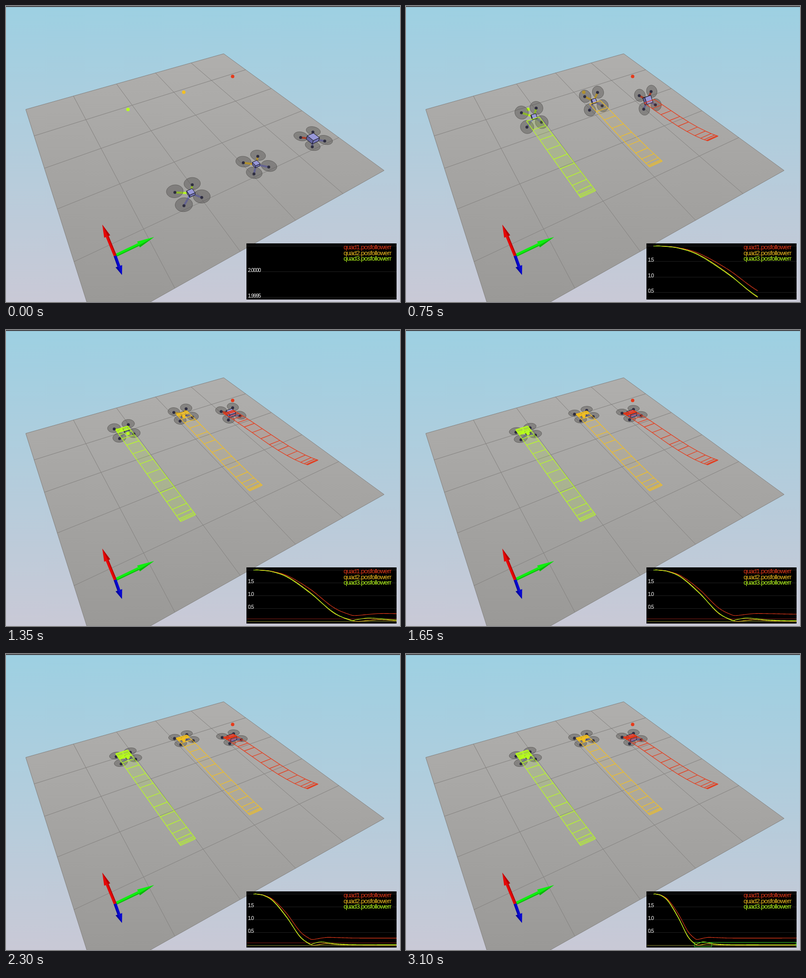
Animation, 798 px wide and 601 px high, one loop 3150 ms. Source, as an HTML page with a canvas:

```html
<!DOCTYPE html>
<html>
<head>
<meta charset="utf-8">
<style>
html, body { margin: 0; width: 100%; height: 100%; overflow: hidden; }
canvas { display: block; }
</style>
</head>
<body>
<canvas id="c" width="798" height="601"></canvas>
<script>
const ctx = document.getElementById('c').getContext('2d');
const LOOP = 3150, FONT = '"Liberation Sans", Arial, sans-serif';
const HOLDS = [500, 1100, 1700, 2350];
const RUNG_GAP = 1.25;

// Smooth curve through (xs[i], ys[i])
function spline(xs, ys) {
  const last = xs.length - 1;
  const slope = i => {
    const a = Math.max(0, i - 1), b = Math.min(last, i + 1);
    return (ys[b] - ys[a]) / (xs[b] - xs[a]);
  };
  return x => {
    let i = 0;
    while (i < last - 1 && x > xs[i + 1]) i++;
    const h = xs[i + 1] - xs[i], t = Math.min(1, (x - xs[i]) / h), r = 1 - t;
    return ys[i] * r * r * (1 + 2 * t) + ys[i + 1] * t * t * (3 - 2 * t)
      + h * (slope(i) * t * r * r - slope(i + 1) * t * t * r);
  };
}

const KNOTS = [0, 3.3, 6, 10, 14, 17, 20, 24, 31, 58];
const pitch = spline([0, 1, 3.3, 6, 8, 10, 14, 17, 20, 24, 31, 58],
  [0, .05, .7, .85, .4, -.3, -.87, -.85, -.7, -.25, 0, 0]);
const ERR_KNOTS = [0, 1, 3.3, 6, 10, 14, 17, 18, 20, 22, 25, 31, 58];

const quads = [
  { name: 'quad1', color: '#e63a1a', from: [621.5, 269], to: [457, 170], sag: 45, goal: [459, 143],
    size: .08, shift: 0, roll: .2, fill: .07,
    move: [0, .03, .14, .47, .8, .955, 1.04, 1.015, 1, 1],
    err: [2, 1.9997, 1.95, 1.777, 1.25, .56, .27, .25, .29, .325, .32, .3, .3] },
  { name: 'quad2', color: '#f4c020', from: [506.5, 321], to: [360, 172], sag: 15, goal: [360, 175],
    size: .049, shift: 0, roll: .1, fill: .07,
    move: [0, .04, .18, .53, .86, .985, 1.03, 1.01, 1, 1],
    err: [2, 1.9996, 1.942, 1.736, 1.12, .35, .075, .025, .055, .085, .05, .025, .02] },
  { name: 'quad3', color: '#b8ff1c', from: [369, 382], to: [242, 209], sag: 0, goal: [247, 210],
    size: .05, shift: .05, roll: .14, fill: .14,
    move: [0, .05, .21, .55, .9, 1.02, 1.06, 1.03, 1, 1],
    err: [2, 1.9995, 1.937, 1.717, 1.1, .37, .06, .09, .15, .13, .075, .05, .05] }
];
for (const q of quads) {
  const s = spline(KNOTS, q.move);
  q.error = spline(ERR_KNOTS, q.err);
  q.pos = n => {
    const f = s(n);
    return [q.from[0] + f * (q.to[0] - q.from[0]),
      q.from[1] + f * (q.to[1] - q.from[1]) + q.sag * f * (1 - f) ** 2];
  };
}

// Camera: the floor spans 5 x 5 cells, z points down
function project(w, x, y, u, v, z) {
  const d = w + .0538 * u - .0924 * v + .1022 * z;
  return [(x * w + 103.9 * u + 11.7 * v + 41 * z) / d,
    (y * w - 17.4 * u + 29.3 * v + 100 * z) / d];
}
const floor = (u, v) => project(1, 40, 210, u, v, 0);

// Projects offsets from a body at screen point (x, y) with the given tilt
function frameAt([x, y], pitch = 0, roll = 0) {
  const w = 1 / (1 + .001895 * (y - 210)), c = Math.cos(pitch), s = Math.sin(pitch);
  return (a, b, d) => project(w, x, y, a * Math.cos(roll),
    b * c + d * s, d * c - b * s + a * Math.sin(roll));
}

function path(points, { fill, stroke, width = 1, closed = true }) {
  ctx.beginPath();
  for (const p of points) ctx.lineTo(...p);
  if (closed) ctx.closePath();
  if (fill) { ctx.fillStyle = fill; ctx.fill(); }
  if (stroke) { ctx.strokeStyle = stroke; ctx.lineWidth = width; ctx.stroke(); }
}
const line = (a, b, stroke, width) => path([a, b], { stroke, width, closed: false });

function dot([x, y], r, color) {
  ctx.fillStyle = color;
  ctx.beginPath();
  ctx.arc(x, y, r, 0, 7);
  ctx.fill();
}

function gradient(y0, y1, a, b) {
  const g = ctx.createLinearGradient(0, y0, 0, y1);
  g.addColorStop(0, a);
  g.addColorStop(1, b);
  return g;
}

function arrow(base, tip, split, half, color, shade) {
  const [x, y] = base, dx = tip[0] - x, dy = tip[1] - y, len = Math.hypot(dx, dy);
  const nx = -dy / len, ny = dx / len, mid = [x + dx * split, y + dy * split];
  const side = k => [mid[0] + nx * k, mid[1] + ny * k];
  line(base, mid, color, 6);
  line([x + nx * 2.2, y + ny * 2.2], side(2.2), shade, 1.6);
  path([side(-half), tip, side(half)], { fill: color });
  path([side(half * .3), tip, side(half)], { fill: shade });
}

function drawScene() {
  ctx.fillStyle = gradient(0, 601, '#9dd0e2', '#c9c9d6');
  ctx.fillRect(0, 0, 798, 601);
  ctx.fillStyle = '#444448';
  ctx.fillRect(0, 0, 798, 2);
  path([floor(0, 0), floor(5, 0), floor(5, 5), floor(0, 5)],
    { fill: gradient(97, 601, '#b0afad', '#9a9997') });
  for (let i = 0; i <= 5; i++) {
    line(floor(i, 0), floor(i, 5), '#858381');
    line(floor(0, i), floor(5, i), '#858381');
  }
  arrow([221, 507], [300, 469], .6, 6.5, '#0ff00f', '#0bb80b');
  arrow([221, 507], [235, 546], .55, 7, '#0808d0', '#0404a0');
  arrow([221, 507], [195, 444], .62, 6.5, '#e60606', '#b00404');
}

function drawBox(at, shift, h) {
  const size = [h, h, h * .55], fills = ['#6464a0', '#7474b4', '#9898d8'];
  for (let i = 0; i < 3; i++) for (const s of [-1, 1]) {
    const face = [[-1, -1], [1, -1], [1, 1], [-1, 1]].map(([a, b]) => {
      const p = [];
      p[i] = s * size[i];
      p[(i + 1) % 3] = a * size[(i + 1) % 3];
      p[(i + 2) % 3] = b * size[(i + 2) % 3];
      return at(p[0] + shift, p[1], p[2]);
    });
    const [a, b, c] = face;
    const area = (b[0] - a[0]) * (c[1] - a[1]) - (b[1] - a[1]) * (c[0] - a[0]);
    if (area * s < 0) path(face, { fill: fills[i], stroke: '#15151f' });
  }
}

function drawQuad(q, n) {
  const tilt = pitch(n), at = frameAt(q.pos(n), tilt, q.roll * Math.max(0, tilt));
  const arms = [[-.16, -.155], [.16, -.155], [.16, .155], [-.16, .155]];
  for (const [a, b] of arms) {
    line(at(q.shift, 0, .01), at(a, b, .02), b < 0 ? q.color : '#7878c0', 4);
    dot(at(a, b, .02), 3, '#1c1c3c');
  }
  for (const [a, b] of arms) {
    const rim = [];
    for (let i = 0; i < 32; i++) {
      const g = i * Math.PI / 16;
      rim.push(at(a + .134 * Math.cos(g), b + .134 * Math.sin(g), -.01));
    }
    path(rim, { fill: 'rgba(74,72,71,.4)', stroke: '#5a5856', width: .8 });
  }
  drawBox(at, q.shift, q.size);
}

// The ribbon trails behind: it grows by one whole segment at a time
function drawRibbon(q, n) {
  let prev;
  for (let i = 0; i <= n && n > 0; i += RUNG_GAP) {
    const at = frameAt(q.pos(i)), rung = [at(-.137, 0, 0), at(.137, 0, 0)];
    if (prev) {
      ctx.globalAlpha = q.fill;
      path([...prev, rung[1], rung[0]], { fill: q.color });
      ctx.globalAlpha = 1;
      line(prev[0], rung[0], q.color, 1.2);
      line(prev[1], rung[1], q.color, 1.2);
    }
    line(...rung, q.color, 1.2);
    prev = rung;
  }
}

function tickStep(range) {
  for (let p = 1e-4; ; p *= 10)
    for (const m of [1, 2, 5]) if (range / (m * p) <= 6) return m * p;
}

function drawChart(n) {
  const L = 487, R = 791, top = n ? 2 : 2.0005;
  let low = n ? 2 : 1.9995;
  for (const q of quads)
    for (let i = 0; i <= n; i += .25) low = Math.min(low, q.error(i));
  const range = top - low, y = v => 487 + (top - v) / range * 104;
  const hline = (yy, color, x0 = L + 1, x1 = R) => line([x0, yy + .5], [x1, yy + .5], color);

  ctx.fillStyle = '#000';
  ctx.fillRect(L, 482, R - L, 114);
  hline(487, '#1e1e1e');
  const step = n ? tickStep(range) : .0005;
  const digits = Math.max(1, Math.ceil(-Math.log10(step) - 1e-9));
  ctx.font = '10.5px ' + FONT;
  ctx.letterSpacing = '-1.1px';
  ctx.textAlign = 'left';
  for (let v = n ? 2 - step : 2; v > low - step / 9; v -= step) {
    const yy = Math.floor(y(v) + .01);
    hline(yy, '#1e1e1e');
    if (yy > 495 && (yy < 588 || !n)) {
      ctx.fillStyle = '#fff';
      ctx.fillText(v.toFixed(digits), 490, yy + 1);
    }
  }

  const settled = n >= 50;
  if (low < .1) {
    if (!settled) hline(586, '#7c1c14');
    hline(591, '#6c6a14');
  }
  const dx = Math.min(15.1, 290 / Math.max(1, n));
  for (const q of quads) {
    const pts = [];
    for (let i = 0; i <= n; i += .25) pts.push([501 + i * dx, y(q.error(i)) + .5]);
    if (n) path(pts, { stroke: q.color, closed: false, width: 1.1 });
  }
  if (settled) {
    const x0 = 501 + 16.6 * dx, x1 = 501 + 23.6 * dx, green = '#3cc828';
    hline(585, green, x0, R);
    hline(594, green, x0, x1);
    for (const x of [x0, x1, R - 1]) line([x, 585], [x, 595], green);
  }

  ctx.font = '13px ' + FONT;
  ctx.letterSpacing = '-0.75px';
  ctx.textAlign = 'right';
  quads.forEach((q, i) => {
    ctx.fillStyle = q.color;
    ctx.fillText(q.name + '.posfollowerr', 780, 494 + 11.7 * i);
  });
  ctx.letterSpacing = '0px';
}

function draw() {
  const t = performance.now() % LOOP;
  const n = Math.floor(t / 50) - HOLDS.filter(h => h <= t).length;
  const goals = () => quads.forEach(q => dot(q.goal, 3.5, q.color));
  drawScene();
  if (n < 16) goals();
  for (const q of quads) drawQuad(q, n);
  if (n >= 16) goals();
  for (const q of quads) drawRibbon(q, n);
  drawChart(n);
  requestAnimationFrame(draw);
}
draw();
</script>
</body>
</html>
```
